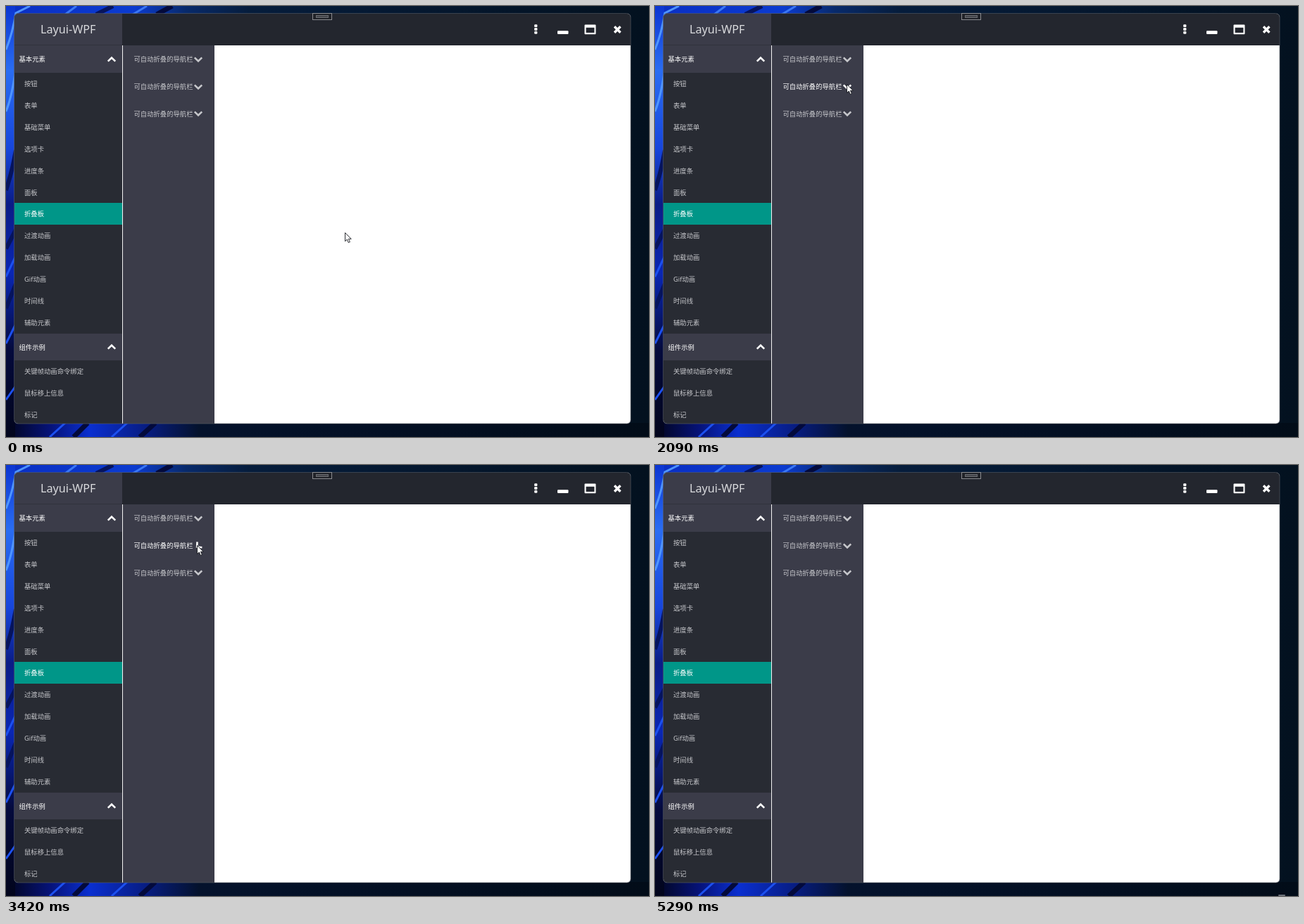
Write an HTML page that moves like this. It is 913 px wide and 613 px high and loops after 5360 ms.

```html
<!DOCTYPE html>
<html lang="zh-CN">
<head>
<meta charset="utf-8">
<title>Layui-WPF</title>
<style>
@property --k { syntax: "<number>"; inherits: true; initial-value: 0; }
@property --r { syntax: "<angle>"; inherits: true; initial-value: 0deg; }

:root { --bar: #23262e; --dark: #282b33; --head: #3b3c49; --dim: #c6c7cb; --loop: 5360ms; }
html, body { margin: 0; width: 100%; height: 100%; overflow: hidden; }
body {
  position: relative; background: #04152a; color: var(--dim);
  font: 9.33px 'Noto Sans', 'Noto Sans CJK SC', 'Noto Sans CJK', sans-serif;
  white-space: nowrap;
}
svg { position: absolute; left: 0; top: 0; overflow: visible; }

.window {
  position: absolute; left: 12px; top: 11px; width: 875px; height: 583px;
  border-radius: 5px; overflow: hidden; background: #fff;
}
.titlebar { height: 45.4px; background: var(--bar); }
.title {
  width: 153px; height: 100%; background: var(--head); box-sizing: border-box;
  padding-left: 37px; font-size: 16.2px; line-height: 45px; color: #d9dadd;
  border-bottom: 1px solid #30323c;
}
.side, .accordion { position: absolute; top: 45.4px; bottom: 0; overflow: hidden; }
.side { left: 0; width: 153px; background: var(--dark); border-right: 1px solid #f4f4f4; }
.side div { height: 30.9px; line-height: 31px; padding-left: 14px; }
.side .group {
  position: relative; height: 38.67px; line-height: 39px; padding-left: 6.5px;
  background: var(--head); color: #fff;
}
.side .on { background: #009688; color: #fff; }
.group svg { left: 138px; top: 19.5px; rotate: 180deg; width: 1px; height: 1px; margin: 0; transform-origin: 0 0; }

.accordion { left: 154px; width: 130px; background: var(--head); }
.panel { color: var(--dim); animation: var(--loop) linear infinite; }
.head { position: relative; height: 38.67px; line-height: 39px; padding-left: 15.5px; }
.head svg { left: 107px; top: 19.5px; width: 1px; height: 1px; transform-origin: 0 0; rotate: var(--r); }
.body {
  height: calc(205.6px * var(--k) * (1.8 - .8 * var(--k)));
  background: var(--dark); overflow: hidden;
}
.cells {
  display: flex; flex-direction: column; gap: 1px; height: 100%; box-sizing: border-box;
  width: 72px; margin-left: 29px; padding: .5px 0; opacity: var(--k);
}
.cells i { flex: 1 1 0; min-height: 0; border-radius: 2px; background: #fff; box-shadow: inset 0 0 0 .6px #dcdedd; }
.chev { fill: none; stroke: currentColor; stroke-width: 2.6; }

.panel:nth-child(1) { animation-name: first; }
.panel:nth-child(2) { animation-name: second; }
.panel:nth-child(3) { animation-name: third; }

@keyframes first {
  0%, 12.87% { --k: 0; --r: 0deg; }
  0%, 7.6% { color: var(--dim); }
  7.7%, 37.2% { color: #fff; }
  19.12% { --k: 1; }
  21.46% { --r: 180deg; }
  29.66% { --k: 1; --r: 180deg; }
  35.91% { --k: 0; }
  37.3%, 100% { color: var(--dim); }
  38.25%, 100% { --k: 0; --r: 0deg; }
}
@keyframes second {
  0%, 41.57% { --k: 0; --r: 0deg; }
  0%, 38% { color: var(--dim); }
  38.1%, 67.8% { color: #fff; }
  47.82% { --k: 1; }
  50.15% { --r: 180deg; }
  57.56% { --k: 1; --r: 180deg; }
  63.81% { --k: 0; }
  66.14%, 100% { --k: 0; --r: 0deg; }
  67.9%, 100% { color: var(--dim); }
}
@keyframes third {
  0%, 71.74% { --k: 0; --r: 0deg; }
  0%, 67.9% { color: var(--dim); }
  68%, 85% { color: #fff; }
  77.99% { --k: 1; }
  80.22% { --r: 180deg; }
  80.32% { --k: 1; --r: 180deg; }
  86.57% { --k: 0; }
  85.1%, 100% { color: var(--dim); }
  88.9%, 100% { --k: 0; --r: 0deg; }
}

.cursor { width: 12px; height: 18px; animation: pointer var(--loop) linear infinite; }
@keyframes pointer {
  0%, .5% { translate: 481px 322px; animation-timing-function: ease-out; }
  8.8%, 25% { translate: 270px 77px; }
  25.9% { translate: 269px 76px; }
  36% { translate: 270px 77px; animation-timing-function: ease-in-out; }
  39%, 41.8% { translate: 272px 111px; }
  47.6%, 65.3% { translate: 271px 114px; animation-timing-function: ease-in-out; }
  69.6% { translate: 271px 151px; }
  80% { translate: 270px 157px; }
  82.5%, 83.6% { translate: 270px 159px; animation-timing-function: ease-in; }
  91.4%, 100% { translate: 860px 640px; }
}
.speck { animation: speck var(--loop) step-end infinite; }
@keyframes speck { 0% { opacity: 0; } 98.69%, 100% { opacity: 1; } }
</style>
</head>
<body>
<svg width="913" height="613" viewBox="0 0 913 613">
  <defs>
    <linearGradient id="sky" x2="1" y2="0">
      <stop offset="0" stop-color="#0a2fc4"/>
      <stop offset=".2" stop-color="#0b3bd0"/>
      <stop offset=".28" stop-color="#082a6b"/>
      <stop offset=".38" stop-color="#061d3c"/>
      <stop offset="1" stop-color="#03111f"/>
    </linearGradient>
    <linearGradient id="edge" x2="0" y2="1">
      <stop offset="0" stop-color="#0c36d2"/>
      <stop offset=".15" stop-color="#2a6df2"/>
      <stop offset=".33" stop-color="#1746dc"/>
      <stop offset=".46" stop-color="#0a1c86"/>
      <stop offset=".62" stop-color="#0a27b4"/>
      <stop offset=".8" stop-color="#040a3c"/>
      <stop offset="1" stop-color="#02051c"/>
    </linearGradient>
    <linearGradient id="floor" x2="1" y2="0">
      <stop offset="0" stop-color="#02051c"/>
      <stop offset=".07" stop-color="#06137a"/>
      <stop offset=".13" stop-color="#0a2fd0"/>
      <stop offset=".22" stop-color="#071c80"/>
      <stop offset=".3" stop-color="#04122c"/>
      <stop offset="1" stop-color="#020c18"/>
    </linearGradient>
  </defs>
  <rect width="913" height="613" fill="url(#sky)"/>
  <rect y="593" width="913" height="20" fill="url(#floor)"/>
  <rect width="13" height="613" fill="url(#edge)"/>
  <g fill="none" stroke-width="3">
    <path stroke="#4f95ff" d="M0 62Q9 40 14 10L34 0M0 150Q8 130 13 95"/>
    <path stroke="#06145e" stroke-width="6" d="M0 262Q9 235 14 205M0 345L14 318M0 430L14 395M128 12L152 0"/>
    <path stroke="#1c50f0" d="M0 385L14 355M0 480L14 452M0 560L14 540M62 613L84 593M150 613L172 593"/>
    <path stroke="#030a3c" stroke-width="7" d="M96 613L116 593M190 613L212 593M214 12L236 0"/>
    <path stroke="#3a78f6" d="M84 12L100 0M180 12L200 0"/>
  </g>
  <rect class="speck" x="885" y="611" width="10" height="2" rx="1" fill="#6b7078"/>
</svg>

<div class="window">
  <div class="titlebar"><div class="title">Layui-WPF</div></div>
  <div class="side"></div>
  <div class="accordion"></div>
</div>

<svg width="913" height="613" viewBox="0 0 913 613">
  <rect x="11.5" y="10.5" width="875.5" height="583.5" rx="5.5" fill="none" stroke="#555962" stroke-opacity=".65"/>
  <rect x="435.5" y="10.5" width="27" height="9" fill="#202228" stroke="#8b8c90"/>
  <rect x="440.5" y="13.5" width="17" height="3" fill="#44464c" stroke="#696b70"/>
  <g fill="#fff">
    <rect x="750.2" y="26.3" width="4.2" height="3.8" rx="1.2"/>
    <rect x="750.2" y="31.1" width="4.2" height="3.8" rx="1.2"/>
    <rect x="750.2" y="35.9" width="4.2" height="3.8" rx="1.2"/>
    <rect x="783" y="35.3" width="15.5" height="4.7" rx="1"/>
    <path fill-rule="evenodd" d="M822.5 26.5h14q1 0 1 1v11.700q0 1-1 1h-14q-1 0-1-1v-11.700q0-1 1-1zM823.600 30.700v7.300h11.800v-7.300z"/>
  </g>
  <path d="M864 29.300l8.400 8.400m0-8.400l-8.400 8.400" stroke="#fff" stroke-width="3.400"/>
</svg>

<svg class="cursor" viewBox="0 0 12 18">
  <path d="M.5 .5V12.600L3.300 10L5.200 14.500L7.300 13.600L5.400 9.300H9.200Z" fill="#fff" stroke="#16181d" stroke-width=".9"/>
</svg>

<script>
const chevron = '<svg><path class="chev" d="M-5.2-2.6L0 2.4L5.2-2.6"/></svg>';
const groups = {
  基本元素: '按钮 表单 基础菜单 选项卡 进度条 面板 折叠板 过渡动画 加载动画 Gif动画 时间线 辅助元素',
  组件示例: '关键帧动画命令绑定 鼠标移上信息 标记'
};
const item = name => `<div${name === '折叠板' ? ' class="on"' : ''}>${name}</div>`;

document.querySelector('.side').innerHTML = Object.entries(groups).map(([name, items]) =>
  `<div class="group">${name}${chevron}</div>` + items.split(' ').map(item).join('')).join('');

document.querySelector('.accordion').innerHTML = `<div class="panel">
  <div class="head">可自动折叠的导航栏${chevron}</div>
  <div class="body"><div class="cells">${'<i></i>'.repeat(7)}</div></div>
</div>`.repeat(3);
</script>
</body>
</html>
```
